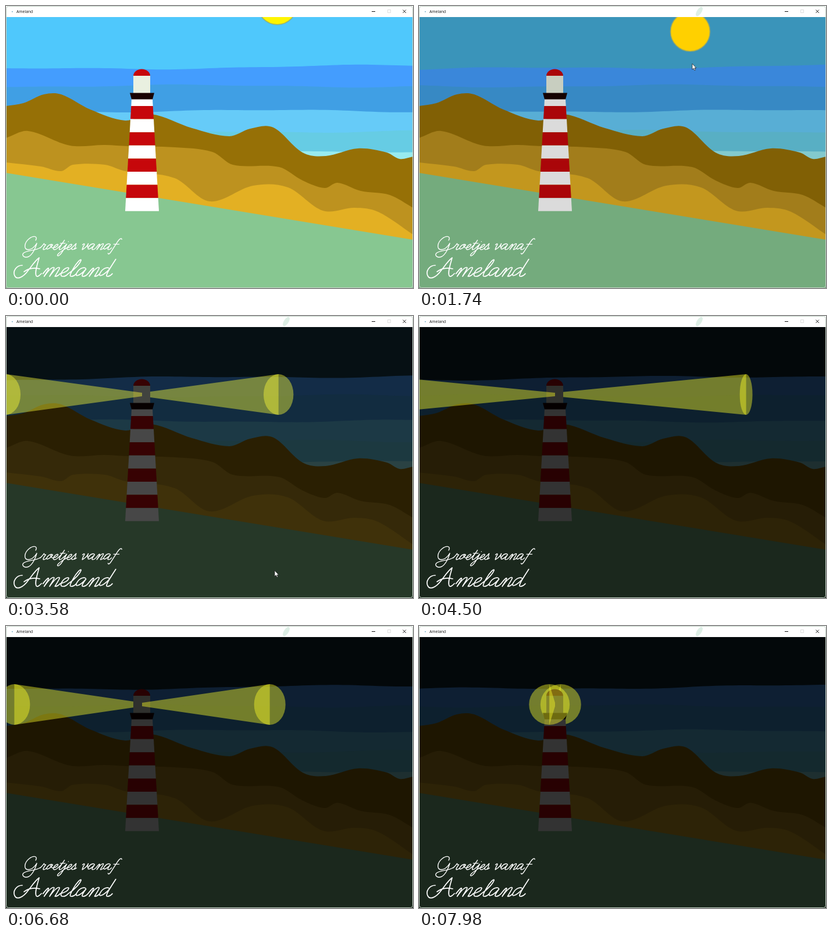
Write an HTML page with a canvas that moves like this. It is 700 px wide and 485 px high and loops after 8000 ms.

```html
<!DOCTYPE html>
<html lang="nl">
<head>
<meta charset="utf-8">
<title>Ameland</title>
<style>
html, body { margin: 0; width: 100%; height: 100%; overflow: hidden; background: #fff; }
canvas { display: block; width: 700px; height: 485px; }
</style>
</head>
<body>
<canvas id="stage" width="700" height="485" role="img" aria-label="Groetjes vanaf Ameland"></canvas>
<script>
const ctx = document.getElementById('stage').getContext('2d');
const LOOP = 8000, TOP = 19, LAMP_ON = 2228, TURN = .000551;

const clamp = (v, a, b) => Math.min(b, Math.max(a, v));
function shade(hex, light) {
  const n = parseInt(hex.slice(1), 16);
  return `rgb(${[n >> 16, n >> 8 & 255, n & 255].map(c => Math.round(c * light)).join()})`;
}
function fillPath(color, path) {
  ctx.fillStyle = color;
  ctx.fill(path);
}
function outline(color, width, path) {
  ctx.strokeStyle = color;
  ctx.lineWidth = width;
  ctx.stroke(path);
}
function ellipse(x, y, rx, ry, from = 0, to = 2 * Math.PI, tilt = 0) {
  const path = new Path2D();
  path.ellipse(x, y, rx, ry, tilt, from, to);
  return path;
}
function polygon(...points) {
  return new Path2D('M' + points.join(' ') + 'Z');
}

// Smooth curve through the crests and hollows, closed along the bottom
function ridge(text) {
  const pts = text.split(' ').map(p => p.split(',').map(Number));
  const slope = i => {
    const a = pts[Math.max(0, i - 1)], b = pts[Math.min(pts.length - 1, i + 1)];
    return (b[1] - a[1]) / (b[0] - a[0]);
  };
  const path = new Path2D();
  path.moveTo(...pts[0]);
  for (let i = 1; i < pts.length; i++) {
    const [x0, y0] = pts[i - 1], [x1, y1] = pts[i], h = (x1 - x0) / 3;
    path.bezierCurveTo(x0 + h, y0 + h * slope(i - 1), x1 - h, y1 - h * slope(i), x1, y1);
  }
  path.lineTo(700, 485);
  path.lineTo(0, 485);
  return path;
}
const land = [
  ['#967006', ridge('0,172 30,167 65,152 95,152 145,178 205,197 250,186 320,210 384,224 420,211 460,209 510,252 550,258 605,245 655,252 677,263 700,259')],
  ['#bd921f', ridge('0,227 38,215 110,240 170,239 210,241 290,243 355,251 390,273 470,277 510,300 548,313 570,304 610,318 660,325 700,347')],
  ['#e3b023', ridge('0,269 60,276 95,284 115,273 170,273 205,284 290,296 350,336 425,309 485,312 545,352 600,347 640,354 700,393')],
  ['#87c791', ridge('0,287 700,402')]
];

const swell = (base, size, seed) => (x, t) =>
  base + size * Math.sin((x - 160) / 90 + seed - t / 1200) + size * .4 * Math.sin(x / 35 + seed + t / 900);
const water = [
  ['#449dfe', (x, t) => swell(109, 2, 0)(x, t) - x / 110],
  ['#409fe4', swell(137.5, 2, 3)],
  ['#66cbf8', swell(180.5, 2, 1.5)],
  ['#66cce4', swell(215.5, 2, 4)],
  ['#98ebf0', swell(250.5, 1, 2)]
];
function sea(t, light) {
  for (const [color, height] of water) {
    const path = new Path2D('M700 485H0');
    for (let x = 0; x <= 700; x += 10) path.lineTo(x, height(x, t));
    fillPath(shade(color, light), path);
  }
}

function sun(depth) {
  const disc = ellipse(466.5, -2 + depth * .56, 34, 34);
  fillPath(`rgb(255,${Math.round(245 - depth * .45)},0)`, disc);
  outline('rgba(150,165,105,.65)', 2, disc);
}

function tower(light) {
  const edge = i => i ? 172 + (i - 1) * 22.6 : 160;
  const flare = y => (y - 160) / 17.5;
  for (let i = 0; i < 9; i++) {
    const a = edge(i), b = edge(i + 1);
    fillPath(shade(i % 2 ? '#c6070b' : '#ffffff', light),
      polygon(216 - flare(a), a, 252 + flare(a), a, 252 + flare(b), b, 216 - flare(b), b));
  }
  fillPath(shade('#c6070b', light), ellipse(233.5, 120.5, 14.5, 12, Math.PI, 2 * Math.PI));
  fillPath(shade('#e9f0e0', light), new Path2D('M219 120h29v30h-29z'));
  fillPath(shade('#180202', light), polygon(213, 149.5, 255, 149.5, 252, 160.5, 216, 160.5));
}

function beam(side, angle, color) {
  const x = 234 + side * 346 * Math.sin(angle);
  fillPath(color, ellipse(x, 135, 35 * Math.abs(Math.cos(angle)), 35));
  fillPath(color, polygon(234, 132, x, 100, x, 170, 234, 138));
}

// Joined script: every letter enters and leaves 3 above the baseline
const tail = 'c2 0 3.5-1.5 4-3';
const bowl = 'm8-5c-2-3-8-2-8 4c0 5 5 4 8-4';
const lead = 'c1-4 2-7 3-6c1 1 0 6 0 9';
const hump = 'c1-6 3-10 5-10c2 0 1 5 1 10';
const letters = {
  a: bowl + 'c-1 5-1 8 1 8' + tail,
  d: bowl + 'l1-11c-1 10-2 19 1 19' + tail,
  e: 'c4-1 7-3 6.5-5.5c-.5-2.5-5.5-1-5.5 4c0 3.5 2 4.5 4 4.5' + tail,
  f: 'm9-14c-2-3-4.5-1-5 5l-1.5 16c-.5 4-2.5 4-3.5 2m1-15h9',
  j: 'c2-3 3-5 3.5-7m.5-4.5h.1m-.6 4.5c0 6 .5 14-1.5 19c-2 4-6 2-4-2c2-4 6-7 9-10',
  l: 'c5-5 7-12 6-15c-1-2-3.5 2-3.5 10c0 6 .5 8 2.5 8' + tail,
  m: lead + hump + hump + tail,
  n: lead + hump + tail,
  o: bowl + 'c-1-2-3-2-3 0c0 3 3 4 6 5',
  r: 'c2-3 2.5-6 3-8c.5 2 2 2 4 2c-1 4-1 9 1 9' + tail,
  s: 'c2-3 3-6 4-8c0 3 3 6 2 9c-1 3-5 2-5 0m4.5 1.2c1.5.3 2.5-1.2 3.5-2.2',
  t: 'c3-4 4-8 4.5-14c-1.5 8-2 17 .5 17m-5-11.5h9m-4 11.5' + tail,
  v: 'm0-5c1-2 2.5-2.5 3 0c0 3 0 7 1 8c3-2 5-6 4.5-10c.5 3 1 6 3.5 7'
};
function script(path, word, x, y, size) {
  const line = new Path2D('M0-3' + [...word].map(c => letters[c]).join(''));
  path.addPath(line, { a: size, b: 0, c: -.55 * size, d: size, e: x, f: y });
}
const greeting = new Path2D('M51 403C55 396 48 394 40 400C31 407 30 419 38 419C45 419 50 413 53 408C51 416 46 427 39 431C32 434 26 429 30 425C36 420 50 421 58 416');
script(greeting, 'roetjes', 57, 419, .95);
script(greeting, 'vanaf', 127, 419, 1.04);
const island = new Path2D('M28 446C18 446 11 456 15 464C19 472 30 466 38 455C45 446 51 437 57 433C54 444 49 458 52 464C54 467 58 463 61 460M31 457C40 450 50 450 58 452');
script(island, 'meland', 61, 465, 1.55);

function lettering() {
  ctx.lineCap = ctx.lineJoin = 'round';
  outline('#fff', 1.4, greeting);
  outline('#fff', 1.7, island);
  ctx.lineCap = 'butt';
  ctx.lineJoin = 'miter';
}

function titleBar(smudged) {
  fillPath('#fff', new Path2D(`M0 0H700V${TOP}H0Z`));
  if (smudged) fillPath('#deefe6', ellipse(482, 9.5, 9, 4, 0, 2 * Math.PI, -1));
  fillPath('#5a9ab8', new Path2D('M10 9h1.5v1.5h-1.5z'));
  ctx.fillStyle = '#111';
  ctx.font = '6.8px "Open Sans", sans-serif';
  ctx.fillText('Ameland', 18, 12);
  outline('#111', 1, new Path2D('M629 9.5h6'));
  outline('#ddd', 1, new Path2D('M656.5 6.5h5v5h-5z'));
  outline('#222', 1, new Path2D('M682.5 6.5l5.5 5.5m0-5.5l-5.5 5.5'));
}

const rim = new Path2D();
rim.roundRect(.5, .5, 699, 484, 4);

const arrow = new Path2D('M0 0V10L2.3 8L4 11.6L5.6 10.8L4 7.4H7Z');
function cursor(x, y) {
  ctx.save();
  ctx.translate(x, y);
  fillPath('#fff', arrow);
  outline('#222', .8, arrow);
  ctx.restore();
}

// The pointer's height sets the sun and the daylight
function draw(t) {
  const mouseY = 99 + (t - 1740) * .184;
  const mouseX = 455 + (mouseY - 300) ** 2 / 2700;
  const depth = clamp(mouseY - 17, 0, 467);
  const light = 1 - .8 * depth / 467;
  const angle = (t - LAMP_ON) * TURN;
  const back = Math.cos(angle) > 0 ? 1 : -1;
  const glow = `rgba(255,255,${Math.round(200 * light)},.42)`;
  const shine = side => t >= LAMP_ON && beam(side, angle, glow);

  ctx.fillStyle = shade('#4fc8fc', light * light);
  ctx.fillRect(0, 0, 700, 485);
  sun(depth);
  sea(t, light);
  for (const [color, path] of land) fillPath(shade(color, light), path);
  shine(back);
  tower(light);
  shine(-back);
  lettering();
  titleBar(mouseY > 0);
  outline('#c3d2c6', 1, rim);
  if (mouseY > -12 && mouseY < 485) cursor(mouseX, mouseY);
}

const start = performance.now();
function tick() {
  draw((performance.now() - start) % LOOP);
  requestAnimationFrame(tick);
}
tick();
</script>
</body>
</html>
```
